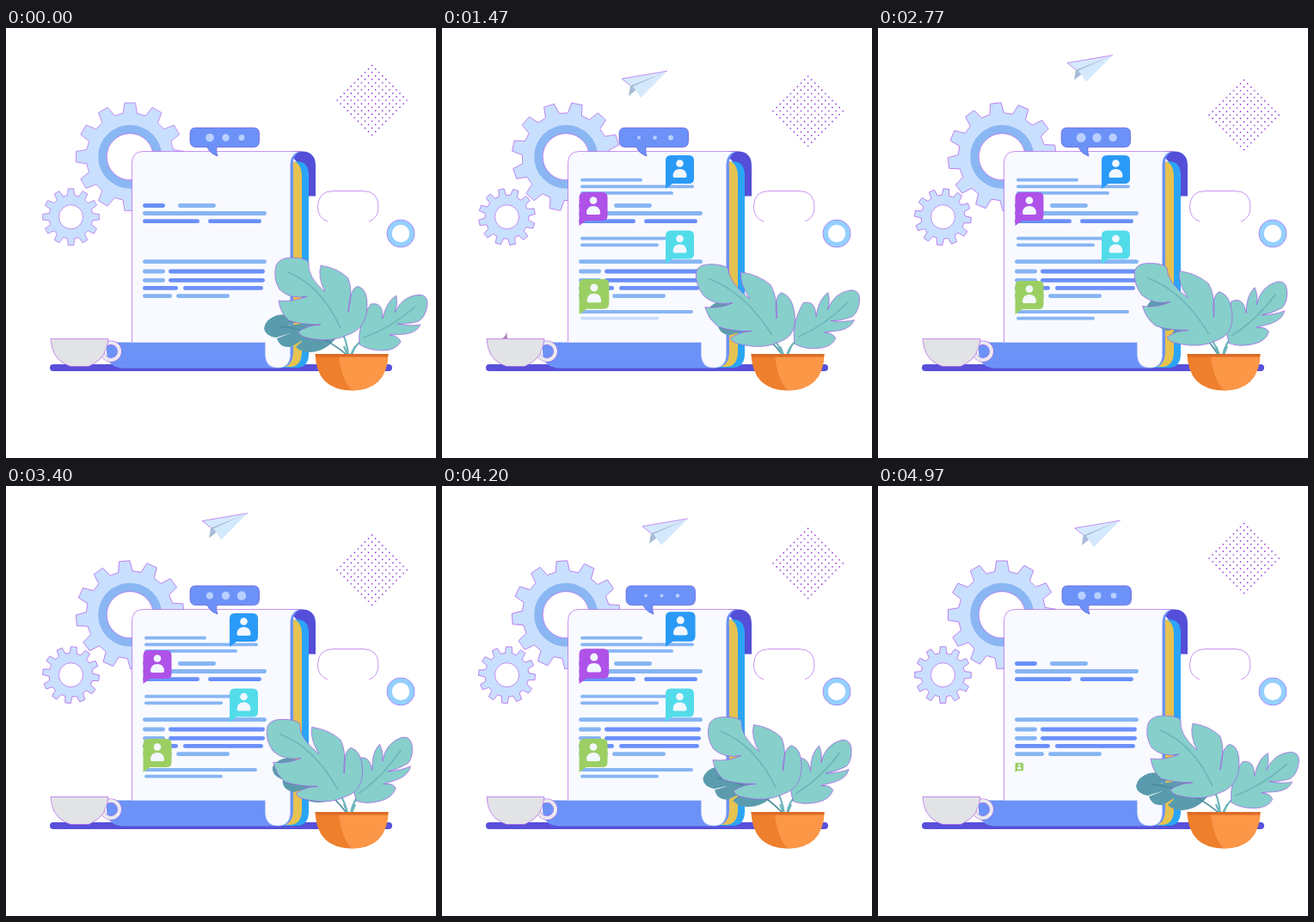
An HTML page for the animation above (5000 ms loop, 500 by 500 pixels).

```html
<!DOCTYPE html>
<html lang="en">
<head>
<meta charset="utf-8">
<title>Document scene</title>
<style>
  html, body { margin: 0; width: 100%; height: 100%; overflow: hidden; background: #fff; }
  svg { display: block; width: 100vw; height: 100vh; }
  .edge { stroke: #a94be8; stroke-width: .6; }
  .line { fill: none; stroke-linecap: round; }
  .leaf { fill: #86cfcb; }
  .vein { fill: none; stroke: #6cb5bc; stroke-width: 1.6; stroke-linecap: round; }
  .stem { fill: none; stroke: #6cb5bc; stroke-width: 2.2; }
</style>
</head>
<body>
<svg viewBox="0 0 500 500">
  <g id="dots" fill="#9238df"></g>
  <path class="edge" fill="none" d="M374 225Q362.500 221 362.500 208Q362.500 189.500 381 189.500H415Q433 189.500 433 208Q433 221 422 225"/>
  <circle cx="459" cy="239" r="13" fill="none" stroke="#a94be8" stroke-width="6.600"/>
  <circle cx="459" cy="239" r="13" fill="#fff" stroke="#94d0ff" stroke-width="5.600"/>

  <g transform="translate(144.200 149.700)">
    <path id="bigGear" class="edge" fill="#c9dffe"/>
    <circle r="32" fill="#fff" stroke="#8ab6f3" stroke-width="10"/>
    <circle class="edge" r="27" fill="#fff"/>
  </g>
  <g transform="translate(75.500 219.700)">
    <path id="smallGear" class="edge" fill="#c9dffe"/>
    <circle class="edge" r="14" fill="#fff"/>
  </g>

  <path class="line" d="M55 395H445" stroke="#5850da" stroke-width="8"/>

  <!-- notebook -->
  <path fill="#544ed8" d="M333 143.500H346Q360 145 360 160V195.500H352V170L333 150Z"/>
  <path fill="#2aa5f6" d="M333 156Q352 152 352 172V380Q351 395 338 395H318Z"/>
  <path fill="#e6c250" d="M333 155Q344 156 344 174V378Q343 394 330 394H318Z"/>
  <path fill="#6c92f8" d="M345 143.500Q332 145 334 164V378Q333 395 318 395L328 370V160Q330 143.500 345 143.500Z"/>
  <path fill="#6c92f8" d="M117 365.500H320V395.500H135Q117 394 117 376Z"/>
  <path fill="#f8faff" d="M146.500 365.500V157Q146.500 143.500 160 143.500H343Q330.500 145 330.500 160V380Q330 395 316 395Q302 395 301.500 380V365.500Z"/>
  <path class="edge" fill="none" d="M146.500 365.500V157Q146.500 143.500 160 143.500H343"/>
  <path fill="none" stroke="#c9d6f8" stroke-width=".7" d="M146 365.500H301.500V380Q302 395 316 395Q330 395 330.500 380"/>

  <!-- cup -->
  <path id="steam" fill="#a884b4" d="M70 361Q75 358 75 352L76 361Z"/>
  <g fill="none">
    <circle cx="122" cy="376" r="10" stroke="#a94be8" stroke-width="5"/>
    <circle cx="122" cy="376" r="10" stroke="#e8e9ed" stroke-width="4.200"/>
  </g>
  <path class="edge" fill="#e2e3e6" d="M52 361.500H119Q117 383 101 391L96 393.500H75L69 391Q53 383 52 361.500Z"/>

  <g id="lines"></g>
  <g id="cards"></g>

  <g id="bubble">
    <path fill="#6c92f8" stroke="#6258dc" stroke-width=".7" d="M220 116H288Q294.500 116 294.500 123V131Q294.500 138.500 288 138.500H245Q244 144 246 149Q237 146 234 138.500H220Q214 138 214 131V123Q214 116 220 116Z"/>
    <g id="pulse" fill="#b9d0ff"></g>
  </g>

  <g id="plane">
    <path fill="#a9bcd8" d="M0 0L-43 17L-45 29L-36 22Z"/>
    <path fill="#d5e9fd" d="M0 0L-53 9L-43 17Z"/>
    <path fill="#d5e9fd" d="M0 0L-40 18L-31 31Z"/>
    <path class="edge" fill="none" d="M-43 17L-53 9L0 0"/>
  </g>

  <!-- plant -->
  <g id="backLeaf">
    <path fill="#5a9cad" d="M300 349Q302 338 315 334Q330 331 342 340L328 346L350 343Q370 340 384 360Q372 376 354 377Q343 377 337 371L348 361L331 371Q318 372 315 361L333 354L314 360Q301 358 300 349Z"/>
    <path class="vein" style="stroke: #4a8b9d" d="M318 347Q360 350 395 379"/>
  </g>
  <g id="rightLeaf">
    <path class="stem" d="M401 380Q406 367 421 358"/>
    <path class="leaf edge" d="M411 368Q408 345 424 321Q439 318 438 338Q442 318 454 311Q456 322 452 331Q461 311 481 310Q491 311 490 322Q488 336 480 341Q466 345 455 344Q470 347 482 345Q478 354 464 356L446 357Q457 358 459 365Q453 375 438 375Q421 375 411 368Z"/>
    <path class="vein" d="M416 360Q447 349 476 324"/>
  </g>
  <g id="leftLeaf">
    <path class="stem" d="M398 381Q397 363 386 344"/>
    <path class="leaf edge" d="M397 357Q378 366 354 361Q341 359 340 353Q352 345 366 345Q343 345 329 340Q319 332 317 317Q334 319 350 312Q330 316 318 304Q310 291 314 276Q318 267 332 267Q348 267 352 272Q350 289 371 307Q362 290 366 276Q386 279 398 291Q404 306 398 330Q399 304 409 300Q421 304 420 324Q419 350 397 357Z"/>
    <path class="vein" d="M328 284Q367 300 389 349"/>
  </g>
  <path class="stem" d="M397 380L393 370M402 380L406 370"/>
  <path fill="#ee7f2c" d="M359.500 379H444.500Q443 421 402 421.500Q361 421 359.500 379Z"/>
  <path fill="#fb9747" d="M387 379H444.500Q443 421 402 421.500Q389 408 387 379Z"/>
  <path fill="#dc6c28" d="M359.500 379H444.500L444 382.500H360Z"/>
</svg>
<script>
const LOOP = 5000, POP = 500;
const LIGHT = '#87b5f3', DARK = '#6b90f9';
const $ = id => document.getElementById(id);
const clamp = v => Math.max(0, Math.min(1, v));
const smooth = p => p * p * (3 - 2 * p);
const backOut = p => 1 + 2.7 * (p - 1) ** 3 + 1.7 * (p - 1) ** 2;
// Rises from 0 to 1 and falls back while p goes from 0 to 1.
const swell = (p, power = 1) => Math.max(0, Math.sin(Math.PI * p)) ** power;

function add(parent, tag, attrs) {
  const el = document.createElementNS('http://www.w3.org/2000/svg', tag);
  for (const name in attrs) el.setAttribute(name, attrs[name]);
  return parent.appendChild(el);
}

function gearPath(teeth, outer, root) {
  const points = [];
  for (let i = 0; i < teeth; i++) {
    for (const [offset, r] of [[-.31, root], [-.19, outer], [.19, outer], [.31, root]]) {
      const a = (i + offset) / teeth * 2 * Math.PI;
      points.push((r * Math.sin(a)).toFixed(2) + ' ' + (-r * Math.cos(a)).toFixed(2));
    }
  }
  return 'M' + points.join('L') + 'Z';
}
$('bigGear').setAttribute('d', gearPath(12, 63, 51));
$('smallGear').setAttribute('d', gearPath(12, 33, 25.5));

for (let i = 0; i < 11; i++)
  for (let j = 0; j < 11; j++)
    add($('dots'), 'circle', { cx: 425.6 + (i - j) * 4.05, cy: 43.5 + (i + j) * 4.05, r: .85 });

function textLine(y, x1, x2, color, width = 4.8) {
  const r = width / 2;
  return add($('lines'), 'path', {
    class: 'line', d: `M${x1 + r} ${y}H${x2 - r}`, stroke: color, 'stroke-width': width
  });
}
// A row of text split by a gap.
function row(y, end, gapStart, gapEnd, left, right) {
  textLine(y, 159, gapStart, left);
  textLine(y, gapEnd, end, right);
}
for (const y of [215.5, 271.7]) textLine(y, 159, 303, LIGHT);
for (const y of [283, 293.3]) row(y, 301, 185, 189, LIGHT, DARK);
row(206.5, 244, 185, 200, DARK, LIGHT);
row(224.7, 297, 225, 235, DARK, DARK);
row(302.4, 299, 200, 206, DARK, DARK);
row(311.6, 260, 193, 198, LIGHT, LIGHT);

// Each card pops up from its tail and brings some lines of text.
const cards = [
  { x: 260, y: 187, fill: '#2a9af7', show: 380, hide: 4100, top: 176.7, ends: [233, 293, 269] },
  { x: 159.5, y: 230, fill: '#af52e8', show: 595, hide: 4100, top: 0, ends: [] },
  { x: 260, y: 274.5, fill: '#52dcea', show: 695, hide: 4475, top: 244.7, ends: [292, 252] },
  { x: 159.5, y: 333, fill: '#9bcf63', show: 1255, hide: 4505, top: 330, ends: [292, 252] }
];
for (const card of cards) {
  card.el = add($('cards'), 'g', {});
  add(card.el, 'path', { fill: card.fill, d: 'M6-39H27Q33-39 33-33V-12Q33-6 27-6H8L0 0V-33Q0-39 6-39Z' });
  add(card.el, 'circle', { cx: 16.5, cy: -29.5, r: 4.3, fill: '#f3f7ff' });
  add(card.el, 'path', { fill: '#f3f7ff', d: 'M8.500-15Q9-23 16.500-23Q24-23 24.500-15Q24.500-13 22.500-13H10.500Q8.500-13 8.500-15Z' });
  card.lines = card.ends.map((end, i) => textLine(card.top + i * 7.6, 161, end, LIGHT, 3.8));
}

const pulse = [0, 1, 2].map(i => add($('pulse'), 'circle', { cx: 237 + i * 18.5, cy: 127.5 }));

const move = (id, value) => $(id).setAttribute('transform', value);
const fade = (el, t, from, to) =>
  el.setAttribute('opacity', clamp((t - from) / 160) * clamp((to - t) / 200));

function drawPlane(t) {
  const launch = clamp((t - 500) / 970);
  const drift = clamp((t - 1470) / 3500);
  const rise = smooth(launch ** 1.2);
  const x = 172 + 90 * rise + 12 * (1 - Math.cos(4 * drift));
  const y = 166 - 116 * rise - 10 * drift - 15 * swell(drift ** .8, 2);
  move('plane', `translate(${x} ${y}) scale(${launch ** .45})`);
  $('plane').setAttribute('opacity', clamp(launch * 3));
}

function drawPlant(p) {
  const lean = swell(p ** .7, 1.6);
  move('leftLeaf', `translate(0 ${380 + 8 * lean}) skewX(${10.6 * lean}) translate(0 -380)`);
  move('rightLeaf', `rotate(${-15 * swell(p * p)} 403 380)`);
  move('backLeaf', `rotate(${18 * swell(p, 1.6)} 395 379)`);
}

function draw(t) {
  const p = t / LOOP;
  const turn = 30 * p + 7 * swell(p, 4);
  move('bigGear', `rotate(${turn})`);
  move('smallGear', `rotate(${-turn})`);
  move('dots', `translate(0 ${17.5 * swell(p, 1.5)})`);
  move('bubble', `translate(${-8 * swell(clamp(t / 3100), 2)} 0)`);
  drawPlane(t);
  drawPlant(p);
  fade($('steam'), t, 1250, 1800);

  pulse.forEach((el, i) =>
    el.setAttribute('r', 3.7 + 1.8 * Math.cos((t - 350 - 165 * i) / 2500 * 2 * Math.PI)));

  for (const { el, x, y, show, hide, lines } of cards) {
    const size = backOut(clamp(Math.min(t - show, hide + POP - t) / POP));
    el.setAttribute('transform', `translate(${x} ${y}) scale(${size})`);
    lines.forEach((line, i) => fade(line, t, show + 60 + 90 * i, hide + 380 + 40 * i));
  }
}

const start = performance.now();
function frame() {
  draw((performance.now() - start) % LOOP);
  requestAnimationFrame(frame);
}
frame();
</script>
</body>
</html>
```
